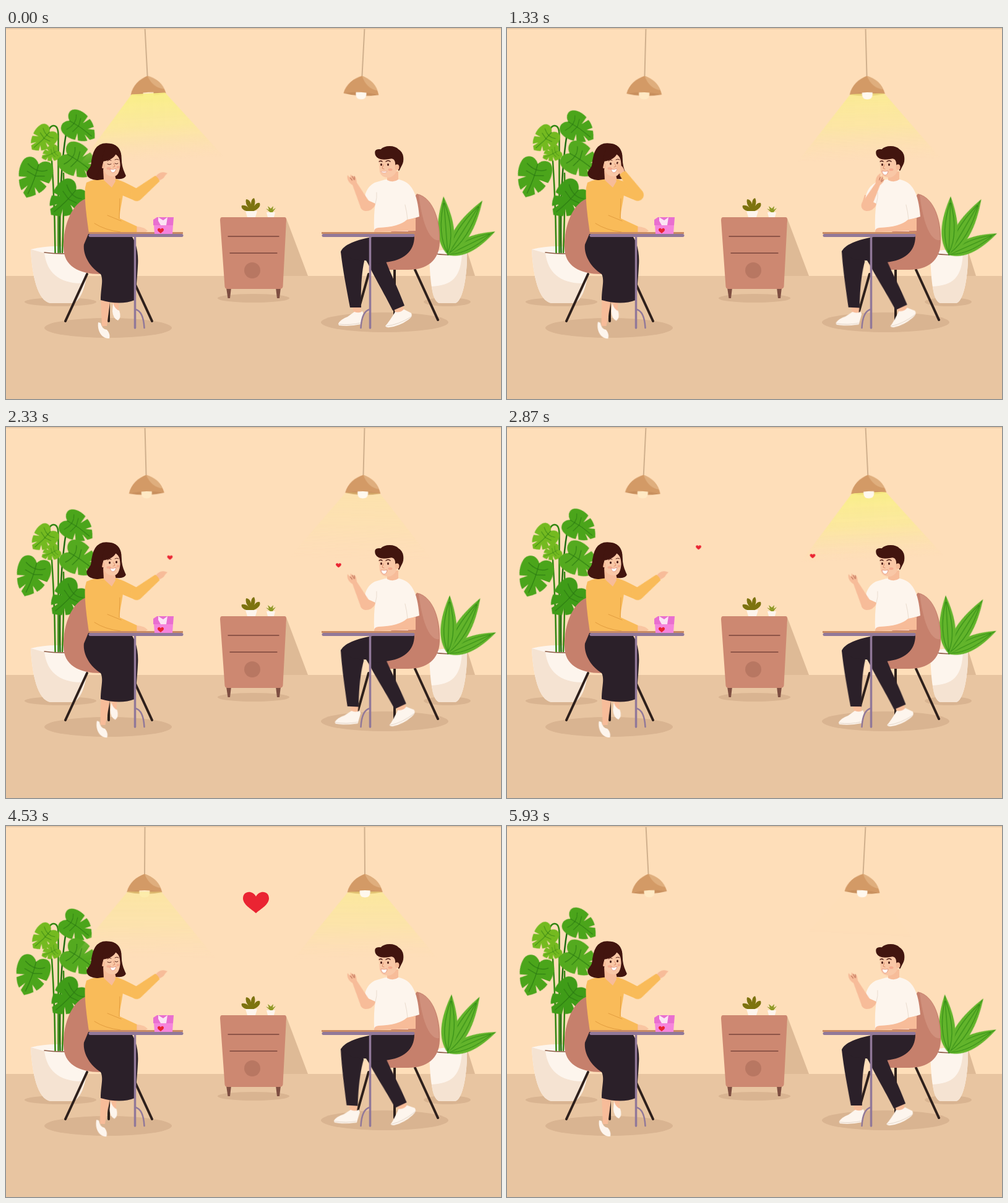
Recreate the animation shown at these times as an HTML page without scripts. Size 800x600 px, loop 5990 ms.

```html
<!DOCTYPE html>
<html lang="en">
<head>
<meta charset="utf-8">
<title>Two tables</title>
<style>
html, body { margin: 0; width: 100%; height: 100%; overflow: hidden; background: #fedeb9; }
svg { display: block; width: 100vw; height: 100vh; }
:root { --loop: 5.99s; --sine: cubic-bezier(.37, 0, .63, 1); }

.lamp { animation: swing calc(var(--loop) / 6) var(--sine) infinite alternate; }
.lamp.back { animation-direction: alternate-reverse; }
@keyframes swing { from { transform: rotate(-3deg); } to { transform: rotate(3deg); } }

.glow-r { animation: glow calc(var(--loop) / 6) var(--sine) infinite alternate; }
@keyframes glow { from { opacity: 0; } to { opacity: 1; } }
.glow-l { animation: flash var(--loop) var(--sine) infinite; }
@keyframes flash { 0%, 66.67% { opacity: 1; } 16.67%, 50%, 83.33%, 100% { opacity: 0; } }

.sway { animation: sway calc(var(--loop) / 12) var(--sine) infinite alternate; }
@keyframes sway { to { transform: translate(var(--x, 0), var(--y, 0)) rotate(var(--r, 0)); } }

.arm { animation: arm var(--loop) ease-in-out infinite; }
@keyframes arm {
  0%, 1.7%, 33.4%, 100% { transform: rotate(var(--out)); }
  11%, 25% { transform: rotate(var(--in)); }
}

/* hearts: steady across, thrown up and falling */
.hx1 { animation: hx1 var(--loop) linear infinite; }
@keyframes hx1 {
  0%, 25% { transform: translateX(178px); }
  30.05% { transform: translateX(228px); }
  35.9% { transform: translateX(250px); }
  66.8%, 100% { transform: translateX(403px); }
}
.hy1 { animation: hy1 var(--loop) linear infinite; }
@keyframes hy1 {
  0%, 25% { transform: translateY(222px); }
  30.05% { transform: translateY(218px); }
  35.9% { transform: translateY(222px); animation-timing-function: cubic-bezier(.333, .667, .667, 1); }
  49.7% { transform: translateY(194.4px); animation-timing-function: cubic-bezier(.333, 0, .667, .333); }
  66.8%, 100% { transform: translateY(235px); }
}
.hx2 { animation: hx2 var(--loop) linear infinite; }
@keyframes hx2 {
  0%, 35.06% { transform: translateX(556px); }
  66.8%, 100% { transform: translateX(403px); }
}
.hy2 { animation: hy2 var(--loop) linear infinite; }
@keyframes hy2 {
  0%, 35.06% { transform: translateY(236px); animation-timing-function: cubic-bezier(.333, .667, .667, 1); }
  50.6% { transform: translateY(208px); animation-timing-function: cubic-bezier(.333, 0, .667, .333); }
  66.8%, 100% { transform: translateY(238px); }
}
.show1 { animation: show1 var(--loop) step-end infinite; }
@keyframes show1 { 0%, 66.8% { opacity: 0; } 27% { opacity: 1; } }
.show2 { animation: show2 var(--loop) step-end infinite; }
@keyframes show2 { 0%, 66.8% { opacity: 0; } 35.06% { opacity: 1; } }
.love { animation: love var(--loop) ease-out infinite; }
@keyframes love {
  0%, 66.79% { transform: translate(403px, 237px) scale(.2); opacity: 0; }
  66.8% { transform: translate(403px, 237px) scale(.2); opacity: 1; }
  75.5%, 90% { transform: translate(404px, 124px) scale(1); opacity: 1; }
  95%, 100% { transform: translate(404px, 124px) scale(1); opacity: 0; }
}

.open { animation: open var(--loop) step-end infinite; }
@keyframes open { 0%, 74.5% { opacity: 0; } 2.2%, 76.8% { opacity: 1; } }
.shut { animation: shut var(--loop) step-end infinite; }
@keyframes shut { 0%, 74.5% { opacity: 1; } 2.2%, 76.8% { opacity: 0; } }
.grin { animation: grin var(--loop) step-end infinite; }
@keyframes grin { 0%, 55% { transform: scaleY(.4); } 22%, 69% { transform: scaleY(1); } }

.line { fill: none; stroke-linecap: round; stroke-linejoin: round; }
.skin { fill: #f7bc99; }
.hair { fill: #42150f; stroke: #42150f; stroke-width: 1.6; stroke-linejoin: round; }
.dark { fill: #2b2029; }
.white { fill: #fdf5ed; }
.wool { fill: #f9bb59; }
.seat { fill: #c6806c; }
.shade { fill: #d9b491; }
</style>
</head>
<body>
<svg viewBox="0 0 800 600" preserveAspectRatio="none">
<defs>
  <linearGradient id="ray" x1="0" y1="0" x2="0" y2="1">
    <stop offset="0" stop-color="#f9f082" stop-opacity=".92"/>
    <stop offset=".5" stop-color="#faec92" stop-opacity=".7"/>
    <stop offset="1" stop-color="#fde0a8" stop-opacity="0"/>
  </linearGradient>
  <path id="beam" fill="url(#ray)" d="M-27 106H27L116 214H-116Z"/>
  <path id="bulb" d="M-8.500 102H8.500V108Q8 115.500 0 115.500Q-8 115.500-8.500 108Z"/>
  <path id="rim" fill="#c88f5d" d="M-28.500 107Q0 113 28.500 107L20 101H-20Z"/>
  <g id="hood">
    <path class="line" d="M0 2V79" stroke="#b0906f" stroke-width="1.200"/>
    <path fill="#d39a66" d="M-28.500 107C-25 92-13 82 0 77.500C13 82 25 92 28.500 107Q0 101-28.500 107Z"/>
    <path fill="#dfae7d" d="M0 77.500C13 82 22 89 26 100Q8 98 0 77.500Z"/>
  </g>
  <path id="heart" fill="#ea2432" d="M0 17C-8 10-21 3-21-7C-21-19-6-21 0-10C6-21 21-19 21-7C21 3 8 10 0 17Z"/>
  <g id="leaf">
    <path d="M0 4C-8-8-24-6-27 8C-29 18-27 28-24 34L-11 30L-22 39Q-18 49-12 54L-5 43L-8 57L0 63Q8 58 13 53L7 42L17 49Q23 42 25 34L11 28L27 28C30 16 28 2 20-4C12-8 4-4 0 4Z"/>
    <path class="line" stroke="#2b7a12" stroke-width="1.100" d="M0 4Q3 30 0 56M1 14Q-8 14-17 9M1 14Q10 14 17 8M2 24L-14 21M2 24L16 19"/>
  </g>
  <g id="blade">
    <path fill="#62b42b" d="M0 0C-21-25-13-62 0-95C13-62 21-25 0 0Z"/>
    <path class="line" stroke="#318a15" stroke-width="1.100" d="M0 0V-92M0-3C-12-28-8-58-1-84M0-3C12-28 8-58 1-84"/>
  </g>
</defs>

<rect width="800" height="600" fill="#fedeb9"/>
<rect width="800" height="2" fill="#e9c8a4"/>
<rect y="401" width="800" height="199" fill="#e8c5a1"/>
<g class="shade">
  <ellipse cx="165" cy="485" rx="103" ry="16"/>
  <ellipse cx="612" cy="476" rx="103" ry="16"/>
  <ellipse cx="400" cy="437" rx="58" ry="7"/>
  <ellipse cx="88" cy="443" rx="58" ry="7"/>
  <ellipse cx="713" cy="443" rx="38" ry="7"/>
  <path d="M453 308L488 401H446ZM744 357L758 401H738Z" opacity=".85"/>
</g>

<!-- cabinet -->
<path fill="#7f4f42" d="M356 420H364L362 437H358.500ZM436 420H444L442 437H438Z"/>
<path fill="#cd8871" d="M349 306H450Q453.500 306 453 311L447.500 418Q447 422 442 422H358Q354 422 353.500 418L346 311Q346 306 349 306Z"/>
<path class="line" stroke="#7b453b" d="M359 337H441M362 364H438" stroke-width="1.400"/>
<circle cx="398" cy="392" r="13" fill="#b87762"/>
<path fill="#7d730f" d="M396 297C384 297 379 291 381 287Q388 286 392 291Q386 283 388 277Q394 277 396 285Q396 276 401 275Q404 281 401 288Q405 282 410 283Q413 291 398 297Z"/>
<path fill="#8f9a27" d="M428 299L420 292L425 294L423 288L428 292L432 288L431 294L436 291L430 299Z"/>
<path class="white" d="M387 296H406L403 306H390ZM421 298H435L433 306H423Z"/>

<!-- tall plant -->
<path class="white" d="M40 358Q85 347 133 360C134 400 124 445 106 445H72C51 442 42 400 40 358Z"/>
<path fill="#f5e3d2" d="M40 358L62 364C66 395 85 414 126 413Q119 445 106 445H72C51 442 42 400 40 358Z"/>
<path class="line" stroke="#8c5a45" stroke-width="1.500" d="M62 363Q90 367 122 363"/>
<g class="line" stroke="#2f850f" stroke-width="2.500">
  <path d="M79.500 363Q79 290 74 215M84.500 363V172Q84 157 76 158Q71 159 69 166M91 363Q94 290 93 235"/>
  <path d="M87.500 363Q85 240 98 165" stroke="#1f6c10"/>
</g>
<g fill="#74ba20">
  <g class="sway" style="--x:2px;--y:1px"><use href="#leaf" transform="translate(72.500 166) rotate(45) scale(.69)"/></g>
  <use href="#leaf" transform="translate(84 198) rotate(65) scale(.46)"/>
</g>
<g fill="#4ba51b">
  <g class="sway" style="--x:-5px;--y:2px"><use href="#leaf" transform="translate(100 148) rotate(-55) scale(.84)"/></g>
  <g class="sway" style="--x:-4px;--y:-1px"><use href="#leaf" transform="translate(54 217) rotate(20) scale(.97)"/></g>
  <g class="sway" style="--x:3px;--y:-2px" fill="#54aa1f"><use href="#leaf" transform="translate(96 202) rotate(-55) scale(.95)"/></g>
  <g class="sway" style="--x:3px" fill="#3f9c18"><use href="#leaf" transform="translate(116 259) rotate(45) scale(.97)"/></g>
</g>

<!-- short plant -->
<path class="white" d="M684 364Q715 354 745 360C746 400 738 445 725 445H700C687 440 685 400 684 364Z"/>
<path fill="#f5e3d2" d="M745 360C746 400 738 445 725 445H700Q690 441 688 418C720 416 736 405 737 361Z"/>
<path class="line" stroke="#8c5a45" stroke-width="1.500" d="M688 364Q715 370 738 363"/>
<g transform="translate(714 367)"><g class="sway" style="--r:3deg"><use href="#blade" transform="rotate(63.700) scale(.9)"/></g></g>
<g transform="translate(714 367)"><g class="sway" style="--r:-3deg"><use href="#blade" transform="rotate(32.500) scale(1 1.100)"/></g></g>
<g transform="translate(714 367)"><g class="sway" style="--r:8deg"><use href="#blade" transform="rotate(-4.200)"/></g></g>

<!-- lamps -->
<g transform="translate(224.500 0)"><g class="lamp">
  <use href="#rim"/><use href="#bulb" fill="#ffe9c4"/><use href="#hood"/><use href="#beam" class="glow-l"/>
</g></g>
<g transform="translate(579.500 0)"><g class="lamp back">
  <use href="#rim"/><use href="#beam" class="glow-r"/><use href="#bulb" fill="#fff8ee"/><use href="#hood"/>
</g></g>

<!-- woman -->
<g class="line" stroke="#2e201c" stroke-width="4"><path d="M131 398L96 474M201 398L236 474M166 438V474"/></g>
<path class="seat" d="M133 275C108 280 92 318 93 355C93 385 118 398 152 398H190V330Z"/>
<g class="sway" style="--r:4.500deg;transform-origin:172px 400px">
  <path class="skin" d="M170 436H182L182 457H174Z"/>
  <path class="white" d="M173 445Q176 455 183 457Q187 468 181 473Q173 470 172 458Z"/>
</g>
<g class="sway" style="--r:4.500deg;transform-origin:160px 440px">
  <path class="skin" d="M153 436H169L163 482L155 482Z"/>
  <path class="white" d="M149 476C147 490 155 503 167 502Q169 495 163 488Q155 487 153 477Z"/>
</g>
<path class="dark" d="M134 331H198C209 340 215 362 213 385C212 405 210 425 208 440Q185 449 153 440C153 420 158 408 153 398C134 386 124 366 126 350Z"/>
<path class="wool" d="M130 250Q142 244 160 243L178 244Q189 248 190 258C189 280 183 295 184 308L212 321V331H134C131 310 126 275 128 258Z"/>
<path class="line" stroke="#e39d3f" d="M184 276L183 308M186 312L164 303M143 316Q160 327 185 330"/>
<path class="skin" d="M211 321Q224 322 229 328Q224 332 211 331Z" opacity=".75"/>

<path class="hair" d="M138 222C140 200 146 187 162 187C178 187 186 195 186 212C186 226 190 232 193 239C190 245 178 244 172 242L150 245C140 246 131 242 131 234C133 228 137 227 138 222Z"/>
<path class="skin" d="M157 228L176 238L178 246L171 258L158 246Z"/>
<path fill="#f9c7a6" d="M156 213C166 211 174 208 177 204C183 208 184.500 214 184.500 222C184 233 180 240 174 240C165 241 159 235 157 226Z"/>
<ellipse class="skin" cx="157" cy="223" rx="3" ry="4"/>
<path class="hair" d="M146 243C155 238 153 225 157 215C169 213 175 208 177 203L185 209C186 194 176 187 162 188Z"/>
<g fill="#f3a086" opacity=".65"><ellipse cx="166" cy="227" rx="3.500" ry="2"/><ellipse cx="181" cy="225" rx="2.500" ry="2"/></g>
<path class="line" stroke="#5b2a20" d="M164 215Q167 212 170 214M176 213Q179 211 182 213"/>
<path class="line" stroke="#d98d6d" d="M174 219L176 224L173 225"/>
<g class="open" fill="#42150f"><ellipse cx="167.500" cy="219.500" rx="1.500" ry="2"/><ellipse cx="178.500" cy="218.500" rx="1.500" ry="2"/></g>
<path class="line shut" stroke="#5b2a20" d="M164 220Q167 222 170 220M176 219Q179 221 181 219"/>
<path fill="#fff" stroke="#d9755f" stroke-width=".6" d="M168 228Q173 230 178 227Q177 234 172 234Q169 233 168 228Z"/>
<path class="wool" d="M176 245C190 246 202 256 213 260L218 273Q213 281 203 277L184 269Z"/>
<g transform="translate(211 270)"><g class="arm" style="--out:52deg;--in:-34deg">
  <path class="skin" d="M-3.500-39C-7-48-5-55-1-58L3-61L4-55C7-50 4-45 3.500-39Z"/>
  <path class="wool" d="M-9.500 0L-6-43Q0-45 5.500-43L10 0A9.750 9.750 0 0 1-9.500 0Z"/>
</g></g>

<!-- left table and gift -->
<g class="line" stroke="#917899">
  <path stroke-width="3.500" d="M208.500 338V485"/><path stroke-width="2.500" d="M209 455Q222 458 223.500 485"/>
  <path stroke-width="5" d="M136 335.500H284"/>
</g>
<path fill="#c98b64" d="M133 330H286V333H133Z"/>
<path fill="#f584dc" d="M239 318H270L269 333H240Z"/>
<path fill="#e96fd0" d="M238 310L244 306H271L270 319H238Z"/>
<path fill="#fbe4f3" d="M246 306L254 311L261 306L259 319H250L246 312Z"/>
<use href="#heart" transform="translate(250 328) scale(.24)"/>

<!-- man -->
<g class="line" stroke="#2e201c" stroke-width="4"><path d="M586 398L565 472M661 391L698 472M628 391V472"/></g>
<path class="seat" d="M664 268C692 274 703 315 701 347C700 376 680 391 650 391H612V345Z"/>
<path fill="#d0907c" d="M667 270C690 276 700 310 700 343C687 345 674 325 667 270Z"/>
<g class="sway" style="--r:3.500deg;transform-origin:560px 360px">
  <path class="skin" d="M559 448H574L573 463H563Z"/>
  <path class="white" d="M537 478Q541 471 552 467L563 459Q571 462 576 458L578 462L574 479Q556 483 538 481Z"/>
  <path class="line" stroke="#e3d5c8" d="M538 479Q556 481 573 477"/>
  <path class="dark" d="M541 362C544 390 551 425 556 452H574C573 420 575 395 579 377L575 352Q550 350 541 362Z"/>
</g>
<g class="sway" style="--r:-2.500deg;transform-origin:600px 365px">
  <g class="sway" style="--r:-5deg;transform-origin:628px 440px">
    <path class="skin" d="M626 450L641 446L643 460L630 464Z"/>
    <path class="white" d="M613 482Q620 474 629 459Q637 461 643 455L655 461Q658 467 650 472Q636 482 620 484Q615 485 613 482Z"/>
    <path class="line" stroke="#e3d5c8" d="M615 482Q634 480 655 467"/>
  </g>
  <path class="dark" d="M579 368C590 394 612 430 625 457L644 449C634 422 621 396 613 375L600 352Z"/>
</g>
<path class="dark" d="M598 337C565 342 545 351 541 362L560 374L580 376L582 376L586 382L613 379C642 376 660 362 660 337Z"/>
<path class="skin" d="M578 270H597V286Q592 296 581 296Q572 294 573 286Z"/>
<path class="white" d="M579 276Q582 257 596 250L613 245H635C655 249 665 266 668 305L649 311L650 329H595Q594 300 597 284Z"/>
<path class="line" stroke="#eadccf" d="M597 284Q600 274 599 266M649 310Q648 298 645 286"/>
<path class="skin" d="M648 310L662 307V328L595 330Q594 324 602 323Q635 322 648 310Z"/>
<path class="skin" d="M616 232H634V245Q626 251 616 246Z"/>
<path fill="#f9c7a6" d="M602 208L631 208C636 220 633 240 618 242Q607 242 604 233Z"/>
<path class="hair" d="M598 206Q594 195 606 197C612 190 628 190 634 197C643 202 643 215 639 222L635 230L630 221C630 213 626 209 620 211C610 213 601 212 598 206Z"/>
<ellipse class="skin" cx="632" cy="225" rx="3.500" ry="4.500"/>
<g fill="#42150f"><ellipse cx="606.500" cy="221" rx="1.400" ry="2"/><ellipse cx="617.500" cy="221" rx="1.400" ry="2"/></g>
<path class="line" stroke="#42150f" stroke-width="1.300" d="M603 216Q606 214 608 216M614 216Q618 213 621 216"/>
<path class="line" stroke="#d98d6d" d="M610 221L608 227L611 228"/>
<ellipse cx="621" cy="229" rx="3.500" ry="2" fill="#f3a086" opacity=".7"/>
<path class="grin" style="transform-origin:611px 232px" fill="#fff" stroke="#d9755f" stroke-width=".6" d="M606 231Q611 233 616 231Q615 238 611 238Q607 237 606 231Z"/>
<g transform="translate(581 287)"><g class="arm" style="--out:-26.600deg;--in:28deg">
  <path class="skin" d="M-8.500 0L-4-39C-8-45-8-52-4-57L-2-51L1-56L2-52Q7-50 6-46L4-39L8.500 0A8.500 8.500 0 0 1-8.500 0Z"/>
  <path class="line" stroke="#b5674e" d="M-2-51L-1-46M2-52L2-46M5-50L3-45"/>
</g></g>

<!-- right table -->
<g class="line" stroke="#917899">
  <path stroke-width="3.500" d="M588.500 338V485"/><path stroke-width="2.500" d="M588 455Q575 458 573.500 485"/>
  <path stroke-width="5" d="M513 335.500H658"/>
</g>
<path fill="#c98b64" d="M510 330H661V333H510Z"/>

<!-- hearts -->
<g class="show1"><g class="hx1"><g class="hy1"><use href="#heart" transform="scale(.21)"/></g></g></g>
<g class="show2"><g class="hx2"><g class="hy2"><use href="#heart" transform="scale(.21)"/></g></g></g>
<g class="love"><use href="#heart"/></g>
</svg>
</body>
</html>
```
